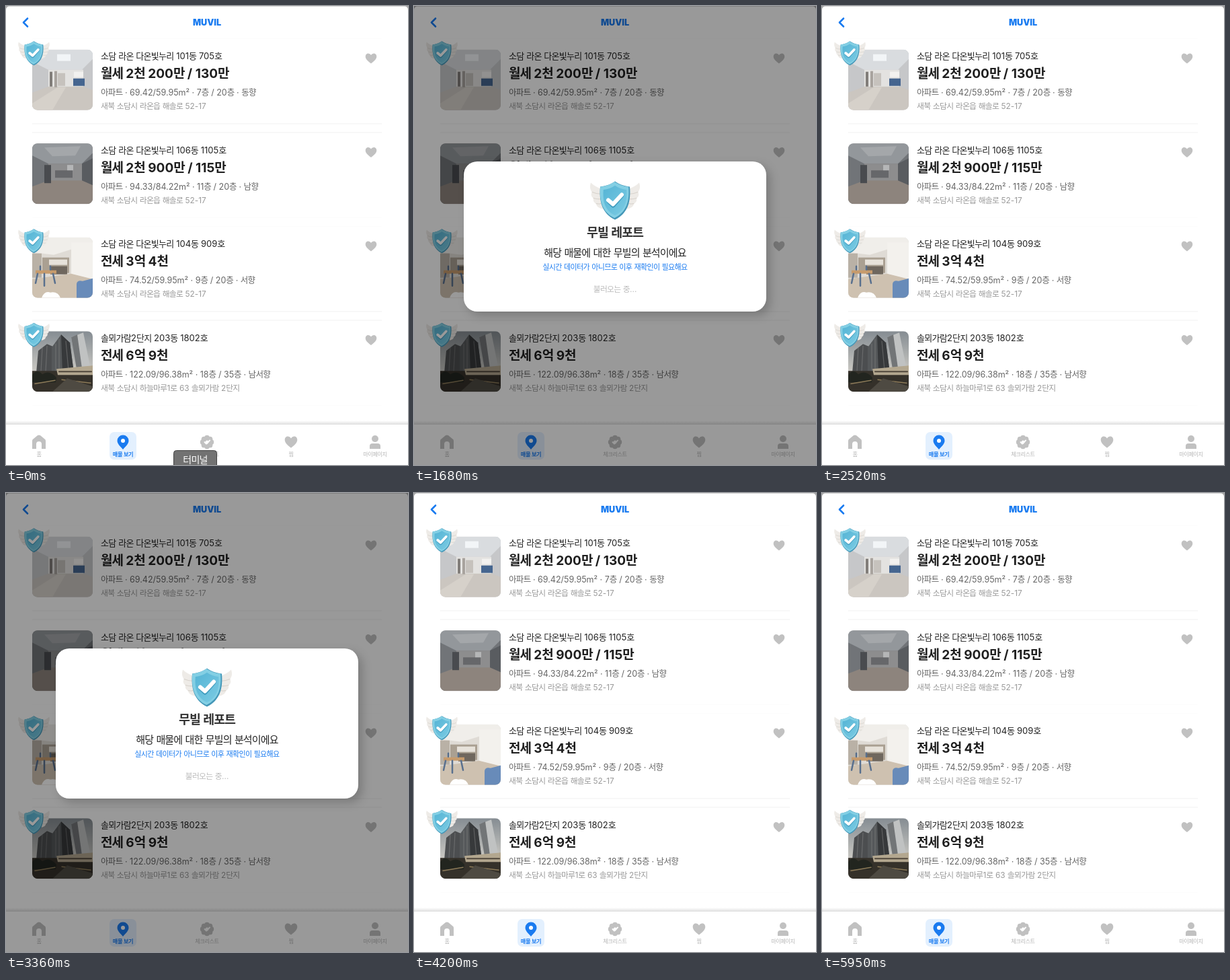
An HTML page that plays this animation: 598 px wide and 682 px high, repeating every 7000 ms.

```html
<!DOCTYPE html>
<html lang="ko">
<meta charset="utf-8">
<style>
  html, body { margin: 0; width: 598px; height: 682px; overflow: hidden; background: #aaa; }
  svg { display: block; }
  text { font-family: Inter, "Noto Sans CJK KR", "Noto Sans CJK", sans-serif; white-space: pre; }
  .hangul { letter-spacing: -.055em; }
  .dialog { filter: drop-shadow(6px 6px 7px #0003); }
</style>
<body>
<script>
const BLUE = '#1a7bf0', GRAY = '#c1c1c1', LOOP = 7000;

// Hangul gets tighter spacing than Latin letters and digits
const text = (x, y, size, fill, str, weight = 400, anchor = 'start') =>
  `<text x="${x}" y="${y}" font-size="${size}" fill="${fill}" font-weight="${weight}" text-anchor="${anchor}">${
    str.replace(/[가-힣]+/g, '<tspan class="hangul">$&</tspan>')}</text>`;
const centered = (x, y, size, fill, str, weight) => text(x, y, size, fill, str, weight, 'middle');
const rect = (x, y, w, h, fill, rx = 0) =>
  `<rect x="${x}" y="${y}" width="${w}" height="${h}" rx="${rx}" fill="${fill}"/>`;
const poly = (points, fill) => `<polygon points="${points}" fill="${fill}"/>`;
const path = (d, fill) => `<path d="${d}" fill="${fill}"/>`;
const line = (d, stroke, width) =>
  `<path d="${d}" fill="none" stroke="${stroke}" stroke-width="${width}" stroke-linecap="round" stroke-linejoin="round"/>`;
const at = (x, y, body, scale = 1) => `<g transform="translate(${x} ${y}) scale(${scale})">${body}</g>`;

const heart = path('M0 7.5C-3 5-8.3 1.5-8.3-3C-8.3-8.5-2.2-9 0-5C2.2-9 8.3-8.5 8.3-3C8.3 1.5 3 5 0 7.5Z', GRAY);

const wing = path('M-17-15C-24-18-31-21-36-26C-38-20-37-15-34-12C-36-10-36-5-32-3C-33 1-31 4-28 5C-28 9-24 12-18 13Z', '#eeebe7') +
  line('M-34-12Q-27-9-20-9M-32-3Q-26-1-20-2M-28 5Q-24 6-20 5', '#d8d3cd', 1.2);
const shield = 'M0-28C7-23 14-21 22-20C24 2 19 20 0 29C-19 20-24 2-22-20C-14-21-7-23 0-28Z';
const badge = wing + `<g transform="scale(-1 1)">${wing}</g>` + path(shield, '#4497b8') +
  at(-.8, -1, path(shield, '#83cfe4'), .95) + at(0, 0, path(shield, 'url(#shine)'), .78) +
  line('M-9 2L-3 8L10-7', '#3f9cbf', 6.5) + line('M-10 0L-3 6L10-8', '#fff', 6);

const room = (ceiling, side, back, floor) => rect(0, 0, 90, 90, side) +
  poly('0,0 90,0 90,14 74,30 24,30 0,18', ceiling) + rect(24, 30, 52, 26, back) +
  poly('0,64 24,55 76,55 90,60 90,90 0,90', floor);
const photos = [
  room('#d9dcdf', '#c6c7c9', '#e3e2e0', '#cbc6c0') + rect(37, 7, 20, 10, '#f2f5f7') +
    rect(26, 33, 4, 22, '#817d79') + rect(33, 32, 4, 24, '#a8a39e') + rect(38, 35, 11, 19, '#c6c2bd') +
    rect(61, 43, 17, 11, '#45658f') + rect(62, 33, 14, 8, '#f2f1ef') + poly('0,80 38,56 50,56 30,90 0,90', '#d6d1ca'),
  room('#93979b', '#717478', '#8d8d8e', '#8d847d') + poly('18,6 72,4 64,18 30,19', '#a4a7aa') +
    rect(18, 32, 10, 27, '#494b4f') + rect(34, 40, 26, 11, '#66676a') + rect(52, 32, 9, 8, '#b5b6b7') +
    poly('74,30 90,22 90,62 74,55', '#595c60'),
  rect(0, 0, 90, 90, '#dfdbd5') + poly('0,0 90,0 90,8 32,26 0,22', '#f0eeea') + rect(58, 8, 32, 54, '#f3f1ed') +
    rect(0, 24, 14, 36, '#b9b1a6') + rect(15, 30, 40, 23, '#aaa092') + rect(25, 33, 27, 8, '#e7e2da') +
    rect(27, 43, 25, 12, '#6f675e') + poly('0,62 58,54 90,62 90,90 0,90', '#cec1b0') + rect(5, 49, 31, 5, '#c69b6d') +
    line('M8 54L5 68M18 54V72M31 54L34 68M12 48V43M27 48V43', '#59708e', 2.5) +
    path('M66 90V69Q67 63 75 65L90 61V90Z', '#688bb9') + path('M14 90Q18 79 27 82Q38 80 42 90Z', '#fff'),
  rect(0, 0, 90, 90, 'url(#sky)') + poly('9,29 22,19 34,24 34,62 6,62', '#4c4e50') +
    poly('29,24 43,5 56,17 62,62 29,62', '#55585a') + poly('43,5 56,17 62,62 45,62', '#37393b') +
    poly('58,9 76,2 88,62 68,62', '#c0c2c2') + poly('58,9 67,5 75,62 67,62', '#727577') +
    line('M15 24L13 60M22 22L20 60M35 19V58M40 12V58M50 15L54 58', '#85868580', 1.2) +
    rect(0, 59, 90, 31, '#35312a') + poly('36,56 90,51 90,65 38,65', '#b3a78f') + line('M40 60H88', '#51483c', 2) +
    path('M0 65Q7 55 15 64Q26 57 36 69L35 76H0Z', '#22251f') + line('M4 78L34 73M44 72L87 77', '#8d7b59', 1.5) +
    poly('30,90 52,70 90,82 90,90', '#4e4a42')
];

const listings = [
  ['소담 라온 다온빛누리 101동 705호', '월세 2천 200만 / 130만', '아파트 · 69.42/59.95m² · 7층 / 20층 · 동향', '새북 소담시 라온읍 해솔로 52-17', 1],
  ['소담 라온 다온빛누리 106동 1105호', '월세 2천 900만 / 115만', '아파트 · 94.33/84.22m² · 11층 / 20층 · 남향', '새북 소담시 라온읍 해솔로 52-17', 0],
  ['소담 라온 다온빛누리 104동 909호', '전세 3억 4천', '아파트 · 74.52/59.95m² · 9층 / 20층 · 서향', '새북 소담시 라온읍 해솔로 52-17', 1],
  ['솔뫼가람2단지 203동 1802호', '전세 6억 9천', '아파트 · 122.09/96.38m² · 18층 / 35층 · 남서향', '새북 소담시 하늘마루1로 63 솔뫼가람 2단지', 1]
];
const listing = ([title, price, detail, address, verified], i) => at(0, i * 139.5,
  rect(39, 48, 520, 1, i % 2 ? '#f1f1f1' : '#fcfcfc') + rect(39, 174.5, 520, 1, i % 2 ? '#fcfcfc' : '#f1f1f1') +
  at(39, 64.7, `<g clip-path="url(#thumb)">${photos[i]}</g>`) +
  (verified ? at(41.5, 70, badge, .63) : '') +
  text(141, 79, 13, '#222', title) + text(141, 107, 19, '#1f1f1f', price, 700) +
  text(141, 133, 12.5, '#666', detail) + text(141, 153, 11.8, '#999', address) + at(543, 78, heart));

const scallop = [...Array(8)].map((_, i) =>
  `<circle cx="${6.3 * Math.cos(i * Math.PI / 4)}" cy="${6.3 * Math.sin(i * Math.PI / 4)}" r="3.9" fill="${GRAY}"/>`).join('');
const tabs = [
  ['홈', path('M-10-2Q-10-4-8-5L-2-10Q0-11 2-10L8-5Q10-4 10-2V10H4V3Q4-1 0-1Q-4-1-4 3V10H-10Z', GRAY)],
  ['매물 보기', path('M0 11C-3 7-8.5 3-8.5-2A8.5 8.5 0 0 1 8.5-2C8.5 3 3 7 0 11Z', BLUE) + '<circle cy="-2" r="3" fill="#fff"/>'],
  ['체크리스트', scallop + line('M-3.5 0L-1 2.5L4-2.5', '#fff', 2)],
  ['찜', at(0, 0, heart, 1.12)],
  ['마이페이지', `<circle cy="-5" r="5" fill="${GRAY}"/>` + path('M-8 10V6Q-8 2-4 2H4Q8 2 8 6V10Z', GRAY)]
];
const tab = ([label, icon], i) => {
  const x = 49 + i * 125, active = i === 1;
  return (active ? rect(x - 20, 633, 40, 41, '#e3f0fe', 7) : '') + at(x, 648, icon) +
    centered(x, 669, 8.2, active ? BLUE : '#b7b7b7', label, active ? 700 : 400);
};

const page = rect(0, .6, 598, 681.4, '#fff', 5) + line('M32 18.5L26 24.5L32 30.5', BLUE, 2.6) +
  centered(299, 28.5, 12.7, BLUE, 'MUVIL', 900) + listings.map(listing).join('') +
  rect(0, 616, 598, 6, 'url(#navShadow)') + rect(0, 622, 598, 60, '#fff') + tabs.map(tab).join('');

const dialog = (top, height, body) => at(0, top,
  `<g class="dialog">${rect(74, 0, 450, height, '#fff', 20)}</g>` + at(299, 57.5, badge) +
  centered(299, 111.5, 18.4, '#333', '무빌 레포트', 700) +
  centered(299, 140.5, 15, '#222', '해당 매물에 대한 무빌의 분석이에요') +
  centered(299, 160.5, 11, BLUE, '실시간 데이터가 아니므로 이후 재확인이 필요해요') + body);
const result = (x, y, label, value, note) => centered(x, y + 4.5, 12, '#333', label, 700) +
  centered(x, y + 43, 35, BLUE, value, 800) + centered(x, y + 66.5, 12, '#b9b9b9', note);
const loading = dialog(231, 223, centered(299, 194, 11.8, '#bbb', '불러오는 중...'));
const report = dialog(131, 423,
  result(196.5, 194, '전세가율', '56%', '안전한 수준이에요') +
  result(401.5, 194, '불법 건축물', '안전', '불법 건축물이 아니에요') +
  result(196.5, 306, '임대인 확인', '완료', '소유자와 임대인이 동일해요') +
  result(401.5, 306, '근저당권', '안전', '근저당권이 없지만, 주의가 필요해요'));

document.body.innerHTML = `<svg width="598" height="682" viewBox="0 0 598 682"><defs>
  <clipPath id="thumb"><rect width="90" height="90" rx="8"/></clipPath>
  <linearGradient id="shine" x2="1" y2="1"><stop stop-color="#55b4d5"/><stop offset="1" stop-color="#7bcbe3"/></linearGradient>
  <linearGradient id="sky" x2="0" y2="1"><stop stop-color="#858c92"/><stop offset=".65" stop-color="#c8c7c2"/></linearGradient>
  <linearGradient id="navShadow" x2="0" y2="1"><stop stop-color="#000" stop-opacity="0"/><stop offset="1" stop-color="#000" stop-opacity=".13"/></linearGradient>
  </defs>${page}
  <g id="tooltip"><rect x="249.5" y="660.5" width="64" height="30" rx="4" fill="#727272" stroke="#444"/>
  ${centered(281.5, 678.5, 14, '#fff', '터미널')}</g>
  <g id="overlay">${rect(0, 0, 598, 682, '#0006')}<g id="loading">${loading}</g><g id="report">${report}</g></g></svg>`;

// [start time, overlay opacity, report ready]
const timeline = [
  [0, 0, 0], [1680, 1, 0], [1750, 1, 1], [2520, 0, 0],
  [3360, 1, 0], [3500, 1, 1], [4130, .5, 1], [4200, 0, 0],
  [5250, 1, 1], [5880, .5, 1], [5950, 0, 0]
];
const part = id => document.getElementById(id).style;
const tooltip = part('tooltip'), overlay = part('overlay'), loadingStyle = part('loading'), reportStyle = part('report');

function draw() {
  const t = performance.now() % LOOP;
  const [, opacity, ready] = timeline.findLast(([start]) => t >= start);
  tooltip.opacity = Math.max(0, 1 - Math.floor(t / 70) / 3);
  overlay.opacity = opacity;
  loadingStyle.display = ready ? 'none' : '';
  reportStyle.display = ready ? '' : 'none';
  requestAnimationFrame(draw);
}
draw();
</script>
</body>
</html>
```
